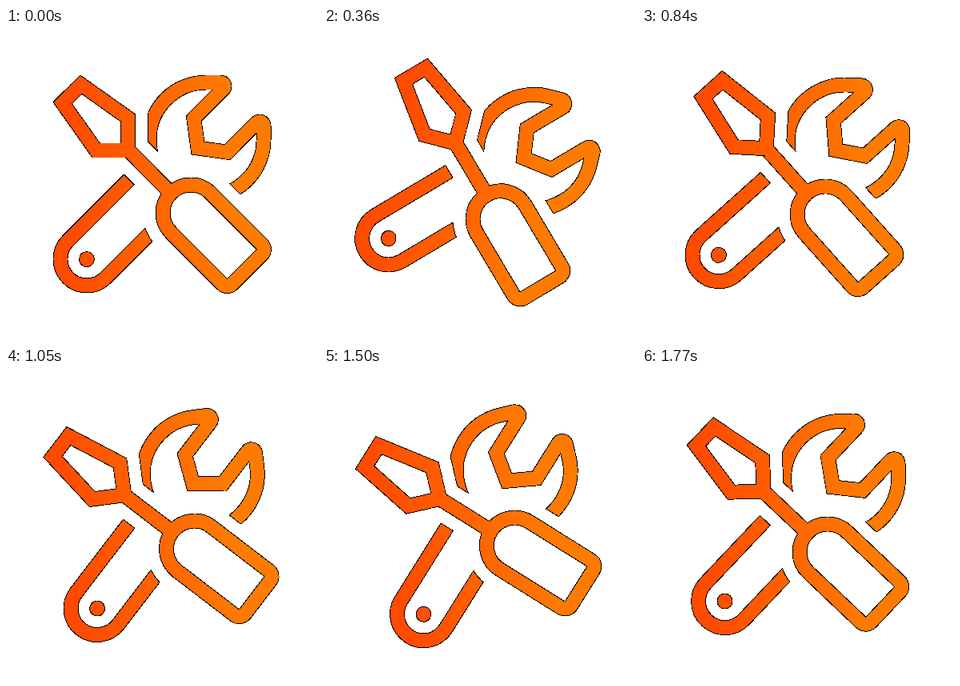
These frames come from a looping animation (390 by 390 pixels, 1.8 s). An HTML page with a canvas:

```html
<!DOCTYPE html>
<html>
<head>
<meta charset="utf-8">
<style>
html, body { margin: 0; width: 100%; height: 100%; overflow: hidden; background: #fff; }
canvas { display: block; width: 390px; height: 390px; }
</style>
</head>
<body>
<canvas id="stage" width="390" height="390"></canvas>
<script>
const SIZE = 390, LOOP = 1800, STEP = 30;
const SWING = Math.PI / 12, EIGHTH = Math.PI / 4;
const LINE = 18, GAP = 16;
const ctx = document.getElementById('stage').getContext('2d', { willReadFrequently: true });

// Centre lines: the screwdriver lies along x, the wrench along y.
function screwdriverPath() {
  const path = new Path2D(), neck = -59.5, grip = 16, half = 35;
  path.moveTo(neck, 0);
  path.lineTo(-88, -28.5);
  path.lineTo(-159.5, -16.3);
  path.lineTo(-159.5, 16.3);
  path.lineTo(-88, 28.5);
  path.closePath();
  path.moveTo(neck, 0);
  path.lineTo(grip, 0);
  path.roundRect(grip, -half, 134.5, 2 * half, [half, LINE / 2, LINE / 2, half]);
  return path;
}

function wrenchPath() {
  const path = new Path2D(), half = 33, end = 133;
  path.moveTo(-half, 20);
  path.lineTo(-half, end);
  path.arc(0, end, half, Math.PI, 0, true);
  path.lineTo(half, 20);

  const r = 71.5, cy = -78.6, mouth = 29.7, bend = -86, round = 5;
  const tip = cy - r * Math.SQRT2 + mouth;
  const side = r * Math.SQRT1_2;
  path.moveTo(side, cy - side);
  path.arc(0, cy, r, -EIGHTH, 5 * EIGHTH);
  path.arcTo(-mouth, tip, -mouth, bend, round);
  path.lineTo(-mouth, bend);
  path.lineTo(0, -63.5);
  path.lineTo(mouth, bend);
  path.arcTo(mouth, tip, side, cy - side, round);
  path.closePath();
  return path;
}

const screwdriver = screwdriverPath(), wrench = wrenchPath();
const rivet = new Path2D();
rivet.arc(0, 133, 9.5, 0, 2 * Math.PI);

const paint = ctx.createLinearGradient(-81, 81, 57, -57);
paint.addColorStop(0, '#ff4b00');
paint.addColorStop(1, '#ff7a00');

// Every partly covered edge pixel becomes black.
function blackenEdges() {
  const image = ctx.getImageData(0, 0, SIZE, SIZE), d = image.data;
  for (let i = 0; i < d.length; i += 4) {
    const a = d[i + 3];
    if (a > 8 && a < 247) d[i] = d[i + 1] = d[i + 2] = 0;
    d[i + 3] = a > 8 ? 255 : 0;
  }
  ctx.putImageData(image, 0, 0);
}

function drawTools(angle) {
  ctx.clearRect(0, 0, SIZE, SIZE);
  ctx.save();
  ctx.translate(SIZE / 2, SIZE / 2);
  ctx.rotate(EIGHTH + angle);
  ctx.fillStyle = ctx.strokeStyle = paint;

  ctx.lineWidth = LINE;
  ctx.stroke(wrench);
  ctx.fill(rivet);

  // Clear a gap around the screwdriver before drawing it.
  ctx.globalCompositeOperation = 'destination-out';
  ctx.lineWidth = LINE + 2 * GAP;
  ctx.stroke(screwdriver);

  ctx.globalCompositeOperation = 'source-over';
  ctx.lineWidth = LINE;
  ctx.stroke(screwdriver);
  ctx.restore();
  blackenEdges();
}

let shown = -1;
function tick() {
  const t = Math.floor(performance.now() % LOOP / STEP) * STEP;
  if (t !== shown) drawTools(SWING * Math.sin(2 * Math.PI * t / LOOP));
  shown = t;
  requestAnimationFrame(tick);
}
tick();
</script>
</body>
</html>
```
